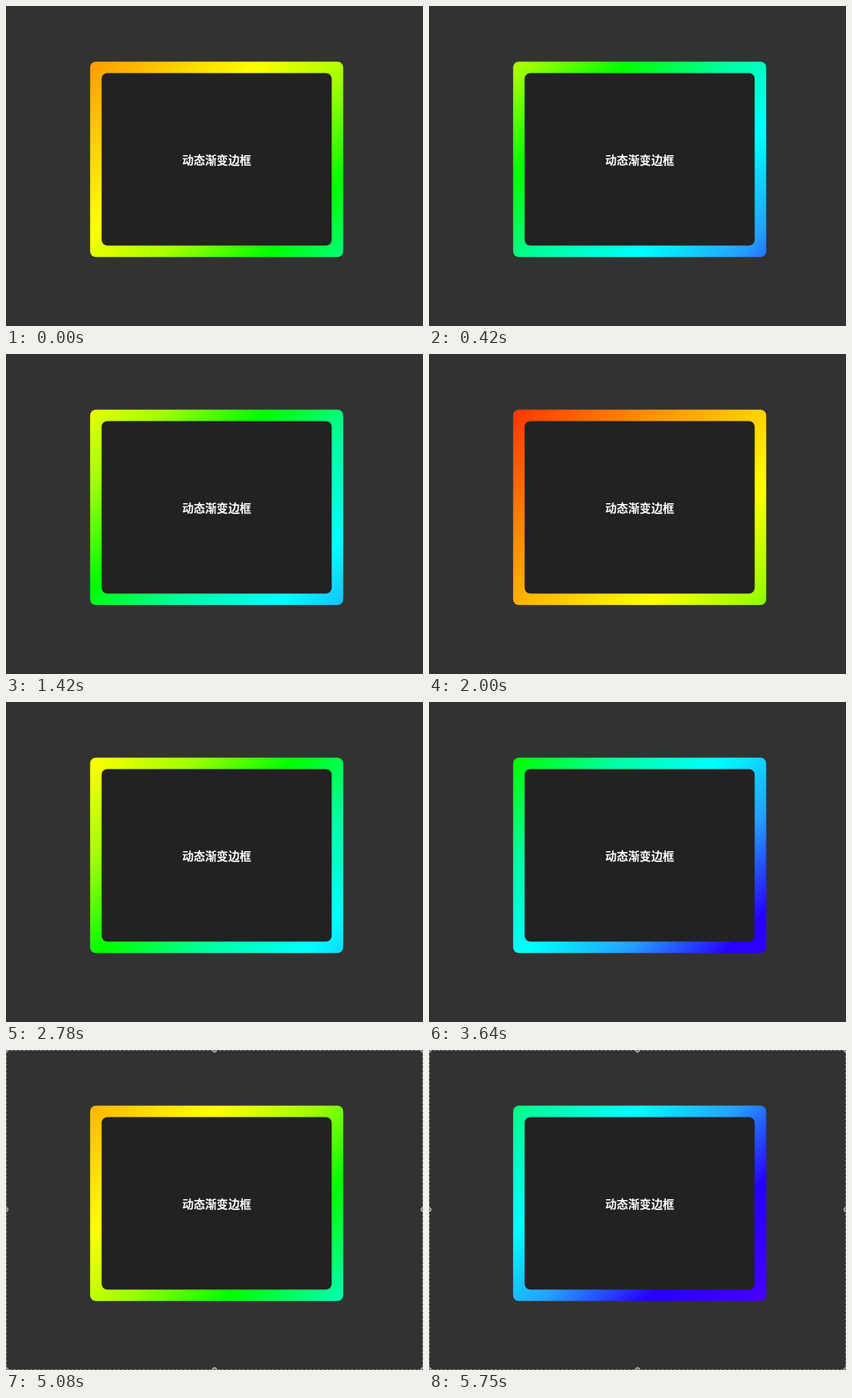
These frames come from a looping animation (500x384 px, 5.78 s). An HTML page:

```html
<!DOCTYPE html>
<html lang="zh-CN">
<head>
<meta charset="utf-8">
<title>动态渐变边框</title>
<style>
  html, body {
    margin: 0;
    width: 100%;
    height: 100%;
    overflow: hidden;
    background: #323232;
  }

  .stage {
    position: relative;
    width: 500px;
    height: 384px;
    overflow: hidden;
  }

  /* laid out at full size, then scaled so that edges fall between pixels */
  .border {
    position: absolute;
    left: 0;
    top: 0;
    width: 440px;
    height: 340px;
    border-radius: 10px;
    transform: translate(100.85px, 66.75px) scale(.6897);
    transform-origin: 0 0;
    /* every second stop is a lifted midtone between two pure hues */
    background: linear-gradient(135deg,
      #f00, #ff4600, #f80, #ffc400, #ff0, #a0ff00, #0f0,
      #00ffa0, #0ff, #24a0ff, #2600ff, #4000ff, #8000ff) 0 0 / 400% 100%;
    animation: slide 5780ms linear infinite;
  }

  .panel {
    position: absolute;
    inset: 20px;
    border-radius: 10px;
    background: #222;
    color: #fff;
    font: bold 20px/300px "Noto Sans CJK SC", "Noto Sans CJK", sans-serif;
    text-align: center;
    white-space: nowrap;
  }

  .selection {
    position: absolute;
    inset: 0;
    animation: appear 5780ms step-end infinite;
  }

  .selection rect {
    fill: none;
    stroke: #888;
    stroke-dasharray: 3 2;
  }

  .selection circle {
    r: 2.5px;
    fill: #777;
    stroke: #ccc;
  }

  /* steady back-and-forth sweep, 1253 ms each way, entered part-way */
  @keyframes slide {
    0% { background-position: 30.6% 0; }
    15.05% { background-position: 100% 0; }
    36.73% { background-position: 0% 0; }
    58.41% { background-position: 100% 0; }
    80.09% { background-position: 0% 0; }
    100% { background-position: 91.9% 0; }
  }

  @keyframes appear {
    0% { visibility: hidden; }
    84.08%, 100% { visibility: visible; }
  }
</style>
</head>
<body>
<div class="stage">
  <div class="border">
    <div class="panel">动态渐变边框</div>
  </div>
  <svg class="selection" width="500" height="384">
    <rect x=".5" y=".5" width="499" height="383"/>
    <circle cx="0" cy="0"/>
    <circle cx="250" cy="0"/>
    <circle cx="500" cy="0"/>
    <circle cx="0" cy="191.5"/>
    <circle cx="500" cy="191.5"/>
    <circle cx="0" cy="383.5"/>
    <circle cx="250" cy="383.5"/>
    <circle cx="500" cy="383.5"/>
  </svg>
</div>
</body>
</html>
```
